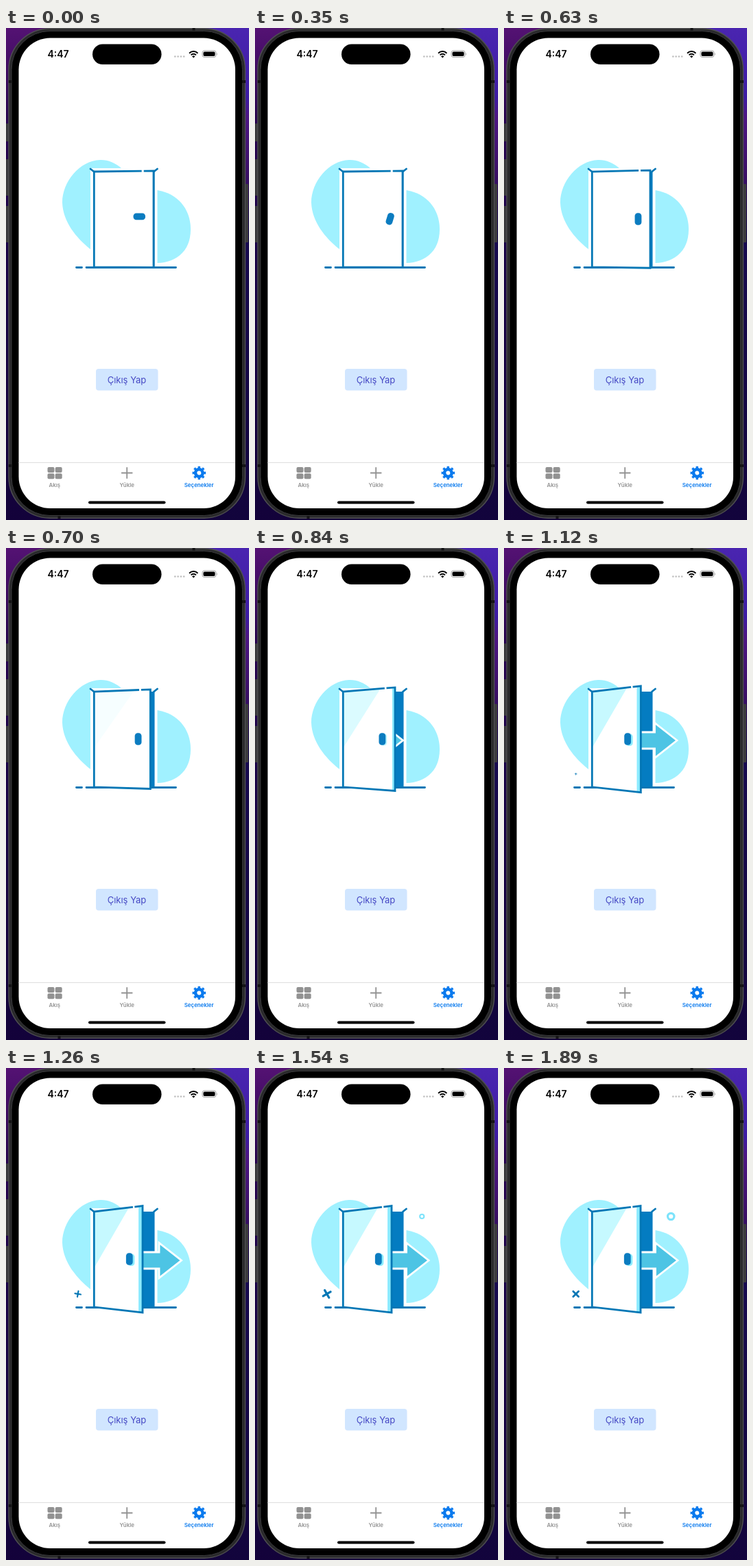
These frames come from a looping animation (354 by 716 pixels, 1960 ms). An HTML page:

```html
<!DOCTYPE html>
<html lang="tr">
<head>
<meta charset="utf-8">
<title>Çıkış</title>
<style>
  html, body { margin: 0; width: 100%; height: 100%; overflow: hidden; background: #12023a; }
  svg { display: block; width: 354px; height: 716px; }
  text { font-family: Inter, Roboto, sans-serif; text-anchor: middle; }
  .line { fill: none; stroke: #0477b5; stroke-width: 2.8; stroke-linecap: round; stroke-linejoin: round; }
  .label { font-size: 7.9px; font-weight: 600; fill: #929292; }
  .active { fill: #0a7aee; }
</style>
</head>
<body>
<svg viewBox="0 0 354 716">
  <defs>
    <linearGradient id="wallLeft" x2="0" y2="1">
      <stop offset="0" stop-color="#541273"/>
      <stop offset=".18" stop-color="#2a0650"/>
      <stop offset=".45" stop-color="#1b0548"/>
      <stop offset="1" stop-color="#13023a"/>
    </linearGradient>
    <linearGradient id="wallRight" x2="0" y2="1">
      <stop offset="0" stop-color="#4a25b0"/>
      <stop offset=".14" stop-color="#3c1ba4"/>
      <stop offset=".18" stop-color="#4d1684"/>
      <stop offset=".3" stop-color="#3a0f66"/>
      <stop offset=".42" stop-color="#170a50"/>
      <stop offset="1" stop-color="#12043c"/>
    </linearGradient>
    <clipPath id="doorway"><rect x="170" y="200" width="120" height="160"/></clipPath>
  </defs>

  <!-- wallpaper and phone -->
  <rect width="177" height="716" fill="url(#wallLeft)"/>
  <rect x="177" width="177" height="716" fill="url(#wallRight)"/>
  <g fill="#3b3b3d">
    <rect x="-2" y="139" width="7" height="26" rx="1"/>
    <rect x="-2" y="191" width="7" height="53" rx="1"/>
    <rect x="-2" y="259" width="7" height="53" rx="1"/>
    <rect x="347" y="227" width="6" height="85" rx="1"/>
  </g>
  <rect x="4" y=".7" width="344.5" height="712.5" rx="60" fill="#29292b" stroke="#505052" stroke-width="1.4"/>
  <rect x="8" y="4.5" width="336.5" height="705" rx="56" fill="#000" stroke="#3a3a3c"/>
  <path d="M4 78h4M344 78h5M4 637h4M344 637h5M273.5 0v4M77.5 710v4" stroke="#141415" stroke-width="4"/>
  <rect x="18.5" y="14.5" width="315.5" height="684.5" rx="46" fill="#fff"/>
  <rect x="126" y="23.5" width="100.5" height="29.5" rx="14.75"/>

  <!-- status bar -->
  <text x="76" y="43" font-size="14" font-weight="600">4:47</text>
  <path d="M246.300 41.5h14" stroke="#bdbdbd" stroke-width="2.6" stroke-linecap="round" stroke-dasharray="0 4.3"/>
  <g fill="none" stroke="#000" stroke-width="2">
    <path d="M267 36.7a8.7 8.7 0 0 1 12.4 0"/>
    <path d="M269.5 39.4a5.2 5.2 0 0 1 7.4 0"/>
  </g>
  <path d="M273.2 43.5l-2.2-2.3a3.2 3.2 0 0 1 4.4 0z"/>
  <rect x="286" y="33" width="20" height="9.5" rx="3" fill="none" stroke="#a4a4a4"/>
  <rect x="287.5" y="34.5" width="17" height="6.5" rx="1.7"/>
  <path d="M307.3 36.3a2 2 0 0 1 0 3.2z" fill="#a4a4a4"/>

  <!-- illustration -->
  <g fill="#a0f1ff">
    <path d="M123 322V204H168C159 196 148 191.5 137 192C107 193 82 224 82 254C83 282 102 305 123 322Z"/>
    <path d="M220.5 236C250 241 269 263 269 293C269 325 248 341 220.5 342Z"/>
  </g>
  <rect x="184" y="209" width="32.5" height="138.5" fill="#047cc1"/>
  <path class="line" d="M102.5 348.5h8M117 348.5h130.5"/>
  <g clip-path="url(#doorway)">
    <path id="arrow" d="M-80 -12H-32.5V-25.5L0 0L-32.5 25.5V12H-80Z" fill="#4dc4e4" stroke="#fff" stroke-width="2.8"/>
  </g>
  <path id="panel" fill="#fff"/>
  <path id="shade" fill="#c6f9ff"/>
  <path id="strip" fill="#8cebff"/>
  <g id="handle">
    <rect id="glow" x="-12.3" y="-5" width="17.5" height="9.8" rx="4.3" fill="#8ceeff"/>
    <rect id="knob" x="-12.3" y="-5" width="17.5" height="9.8" rx="4.3" fill="#0b7cc0"/>
  </g>
  <path class="line" d="M123 205l5 4M220.5 205l-5 4"/>
  <path id="outline" class="line" style="stroke-linecap:butt;stroke-linejoin:miter"/>
  <path id="cross" class="line" d="M-5.5 0H5.5M0 -5.5V5.5"/>
  <circle id="ring" r="4.7" fill="none" stroke="#7de3fb" stroke-width="3.2"/>

  <!-- button -->
  <rect x="131" y="496" width="90.5" height="31.5" rx="4" fill="#d1e6ff"/>
  <text x="176" y="516.7" font-size="13" fill="#4548c4">Çıkış Yap</text>

  <!-- tab bar -->
  <path d="M18.5 632.5H334" stroke="#dedede"/>
  <g fill="#929292">
    <rect x="60.5" y="639" width="10" height="8" rx="2"/>
    <rect x="71.7" y="639" width="10" height="8" rx="2"/>
    <rect x="60.5" y="648.3" width="10" height="8" rx="2"/>
    <rect x="71.7" y="648.3" width="10" height="8" rx="2"/>
  </g>
  <path d="M168.7 647.5h15M176.2 640v15" stroke="#929292" stroke-width="1.8" stroke-linecap="round"/>
  <g fill="none" stroke="#0a7aee" transform="translate(281.3 647.5) rotate(-11.25)">
    <circle r="5.3" stroke-width="4.6"/>
    <circle r="8.3" stroke-width="3" pathLength="16" stroke-dasharray="1"/>
  </g>
  <text class="label" x="70.8" y="668.3">Akış</text>
  <text class="label" x="176.2" y="668.3">Yükle</text>
  <text class="label active" x="281.2" y="668.3">Seçenekler</text>
  <rect x="120" y="688.5" width="112.5" height="4" rx="2"/>
</svg>
<script>
  const LOOP = 1960, STEP = 70;
  const el = id => document.getElementById(id);
  const place = (id, transform) => el(id).setAttribute('transform', transform);
  const draw = (id, d) => el(id).setAttribute('d', d);

  // Linear interpolation through [time, value] points.
  function track(points, t) {
    const i = points.findIndex(p => p[0] > t);
    if (i < 0) return points[points.length - 1][1];
    if (i === 0) return points[0][1];
    const [t0, a] = points[i - 1], [t1, b] = points[i];
    return a + (b - a) * (t - t0) / (t1 - t0);
  }

  const swing = [[420, 0], [490, .3], [560, .9], [630, 2], [700, 4.6], [770, 8], [840, 11],
    [910, 12.9], [980, 14.2], [1050, 15.1], [1120, 15.7], [1190, 16]];
  const tip = [[630, 164], [770, 195], [840, 215.5], [910, 229], [980, 239.5], [1050, 247],
    [1120, 252], [1190, 254.5], [1260, 255.5], [1400, 254.5], [1540, 253]];
  const crossSize = [[1050, 0], [1260, .78], [1470, 1.15], [1610, 1.12], [1820, 1]];
  const crossTurn = [[1050, 0], [1260, 10], [1400, 42], [1540, 60], [1820, 45]];
  const ringSize = [[1400, 0], [1540, .65], [1680, 1.05], [1750, 1.1], [1890, 1]];

  function drawDoor(t) {
    const d = track(swing, t), open = d / 16;
    const left = 128.3, right = 215 - d;
    const top = 208 - d * .46, bottom = 348.3 + d * .47;
    const at = (f, a, b) => `${left + (right - left) * f} ${a + (b - a) * f}`;
    const onTop = f => at(f, 209, top);
    const onBottom = f => at(f, 347.8, bottom);
    const inner = 1 - d * .37 / (right - left);
    const tint = Math.max(0, (open - .15) / .85);

    draw('panel', `M${onTop(0)}L${onTop(1)}L${onBottom(1)}L${onBottom(0)}Z`);
    draw('shade', `M${onTop(0)}L${onTop(.72)}L${left} 291Z`);
    draw('strip', `M${onTop(inner)}L${onTop(1)}L${onBottom(1)}L${onBottom(inner)}Z`);
    draw('outline', `M${onTop(.8)}L${onTop(0)}L${onBottom(0)}L${onBottom(1)}L${onTop(1)}L${onTop(.835)}`);
    el('shade').style.opacity = tint;

    const turn = -45 * (1 - Math.cos(Math.PI * Math.min(t / 490, 1)));
    place('handle', `translate(${197.8 - d * 1.12} 274.4)`);
    place('knob', `rotate(${turn})`);
    place('glow', `translate(${2.7 * open} ${1.3 * open}) rotate(${turn})`);
    el('glow').style.opacity = tint;
  }

  function render(t) {
    drawDoor(t);
    place('arrow', `translate(${track(tip, t)} 280)`);
    place('cross', `translate(104.7 328.8) rotate(${track(crossTurn, t)}) scale(${track(crossSize, t)})`);
    place('ring', `translate(243.2 216) scale(${track(ringSize, t)})`);
  }

  let start;
  function tick(now) {
    start ??= now;
    const t = (now - start) % LOOP;
    render(Math.floor(t / STEP) * STEP);
    requestAnimationFrame(tick);
  }
  render(0);
  requestAnimationFrame(tick);
</script>
</body>
</html>
```
